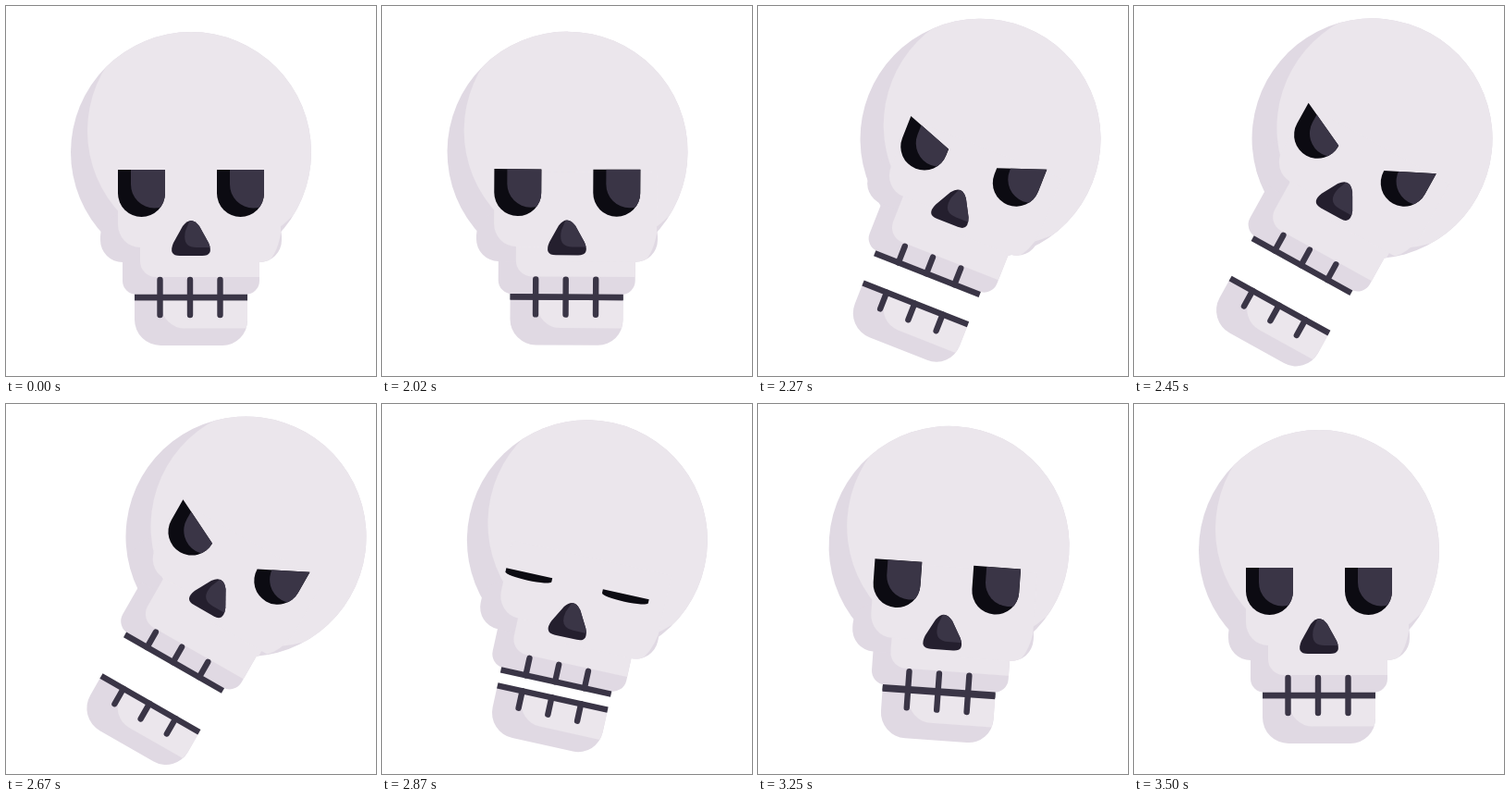
Animation, 400 px wide and 400 px high, one loop 3520 ms. Source, as an HTML page:

```html
<!DOCTYPE html>
<html lang="en">
<head>
<meta charset="utf-8">
<title>Skull</title>
<style>
  html, body { margin: 0; height: 100%; overflow: hidden; background: #fff; }
  svg { display: block; width: 100vw; height: 100vh; }
  .bone { fill: #e0d9e3; }
  .light { fill: #ebe6ec; }
  .socket { fill: #0c0b12; }
  .shine { fill: #3a3546; }
  .teeth { fill: none; stroke: #3a3546; stroke-width: 6.4; }
  .round { stroke-linecap: round; }
</style>
</head>
<body>
<svg viewBox="0 0 400 400">
  <defs>
    <circle id="dome" cx="200" cy="158" r="130"/>
    <rect id="upperJaw" x="126" y="200" width="148" height="112" rx="15"/>
    <rect id="cheeks" class="lifted" x="102" y="225" width="196" height="52" rx="24"/>
    <path id="nose" d="M191 238Q200 226 209 238L219 256Q225 270 212 270H188Q175 270 181 256Z"/>
    <clipPath id="inSkull"><use href="#dome"/><use href="#upperJaw"/><use href="#cheeks"/></clipPath>
    <clipPath id="inNose"><use href="#nose"/></clipPath>
    <clipPath id="inEyeL"><path class="eyeL"/></clipPath>
    <clipPath id="inEyeR"><path class="eyeR"/></clipPath>
  </defs>
  <g id="head">
    <g id="jaw">
      <path class="bone" d="M139 315H261V340A27 27 0 0 1 234 367H167A28 28 0 0 1 139 339Z"/>
      <path class="light" d="M168 315V324A25 25 0 0 0 193 348.500H259.700L261 340V315Z"/>
      <path class="teeth" d="M139 315H261"/>
      <path class="teeth round" d="M166.500 315V334M199 315V334M231.500 315V334"/>
    </g>
    <g class="bone"><use href="#dome"/><use href="#upperJaw"/><use href="#cheeks"/></g>
    <g class="light" clip-path="url(#inSkull)">
      <circle cx="218" cy="135" r="130"/>
      <path d="M145 200V276A17 17 0 0 0 162 293H276V200Z"/>
      <path class="lifted" d="M121 180V236A24 25 0 0 0 145 261H200V277H283Q293 268 297 246V180Z"/>
    </g>
    <path class="teeth" d="M139 315H261"/>
    <path class="teeth round" d="M166.500 296V315M199 296V315M231.500 296V315"/>
    <g class="lifted">
      <use href="#nose" fill="#241f2e"/>
      <path class="shine" clip-path="url(#inNose)" d="M201 226L194 243Q190 261 206 261H230V226Z"/>
      <g id="eyes">
        <path class="socket eyeL"/>
        <path class="socket eyeR"/>
        <g clip-path="url(#inEyeL)"><path class="shine glint" d="M135 100V193A25.500 25.500 0 0 0 186 193V100Z"/></g>
        <g clip-path="url(#inEyeR)"><path class="shine glint" d="M242 100V193A25.500 25.500 0 0 0 293 193V100Z"/></g>
      </g>
    </g>
  </g>
</svg>
<script>
const LOOP = 3520;
const LID = 217; // height the eyes close towards

const progress = (t, from, to) => Math.min(1, Math.max(0, (t - from) / (to - from)));
const smooth = u => u * u * (3 - 2 * u);
const ramp = (t, from, to) => smooth(progress(t, from, to));
// Quick start, long settling
const swing = (t, from, to) => smooth(1 - (1 - progress(t, from, to)) ** 2);

const setAll = (selector, name, value) =>
  document.querySelectorAll(selector).forEach(el => el.setAttribute(name, value));
const move = (selector, transform) => setAll(selector, 'transform', transform);
const eyePath = (x, left, right) =>
  `M${x} ${177 + left}L${x + 51} ${177 + right}V202.5A25.5 25.5 0 0 1 ${x} 202.5Z`;

function draw(t) {
  // Tilt right, swing back past upright, rebound, settle
  const turn = 29.8 * swing(t, 2000, 2660) - 36.4 * ramp(t, 2665, 3090)
    + 11.8 * ramp(t, 3090, 3290) - 5.2 * ramp(t, 3290, 3500);
  const drop = 12 * (ramp(t, 2890, 3070) - ramp(t, 3070, 3260));
  const gape = 51.5 * swing(t, 2025, 2670) - 40.5 * swing(t, 2670, 3070) - 11 * ramp(t, 3070, 3300);
  const anger = swing(t, 2000, 2660) - ramp(t, 2670, 2960);
  const blink = ramp(t, 2670, 2870) - ramp(t, 2870, 3100);
  const frown = 25.4 * anger * (1 - blink);

  // The head travels along an arc tied to its tilt
  const x = turn * (1.59 + 0.0137 * turn);
  const y = drop - turn * (1.13 - 0.0215 * turn);

  move('#head', `translate(${x} ${y}) rotate(${turn} 200 158)`);
  move('#jaw', `translate(0 ${gape})`);
  move('.lifted', `translate(0 ${-20 * anger})`);
  move('#eyes', `translate(0 ${LID}) scale(1 ${1 - 0.84 * blink}) translate(0 ${-LID})`);
  move('.glint', `translate(0 ${-51 * blink})`);
  setAll('.eyeL', 'd', eyePath(121, 0, frown));
  setAll('.eyeR', 'd', eyePath(228, frown, 0));
}

const start = performance.now();
function tick() {
  draw((performance.now() - start) % LOOP);
  requestAnimationFrame(tick);
}
tick();
</script>
</body>
</html>
```
